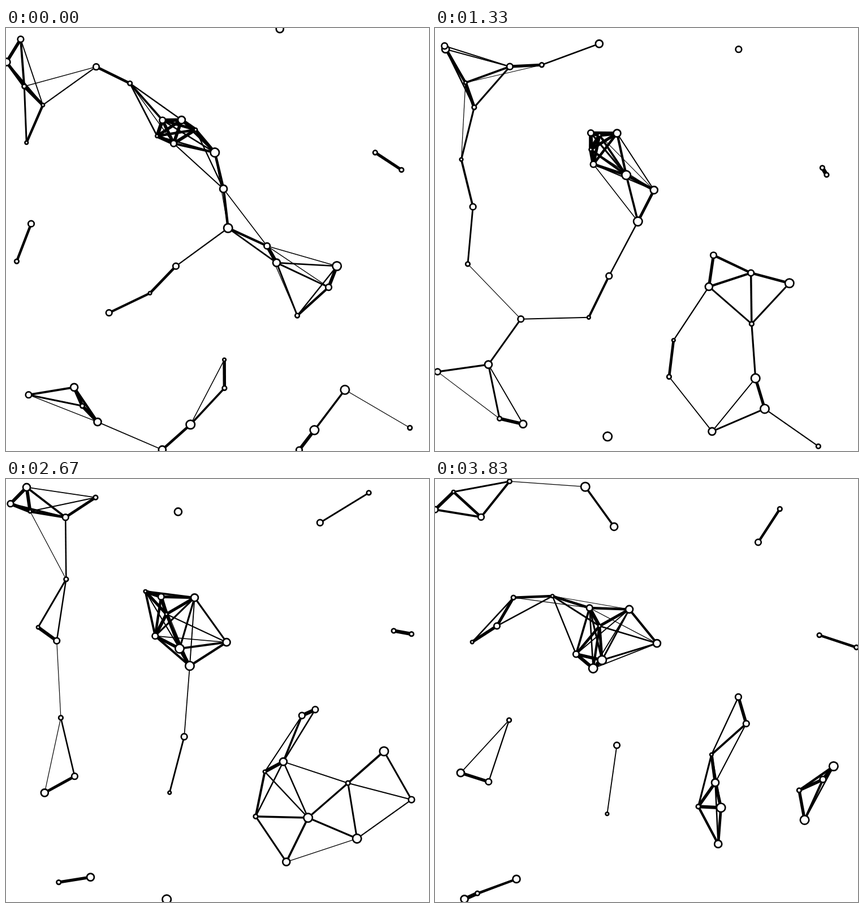
Recreate the animation shown at these times as an HTML page with a canvas. Size 748 by 748 pixels, loop 3.87 s.

```html
<!DOCTYPE html>
<html lang="en">
<head>
<meta charset="utf-8">
<title>Drifting network</title>
<style>
  html, body { margin: 0; height: 100%; overflow: hidden; background: #fff; }
  canvas { display: block; width: 100vw; height: 100vh; }
</style>
</head>
<body>
<canvas id="stage" width="748" height="748"></canvas>
<script>
const SIZE = 748, LOOP = 3870, FPS = 24, LAST_STEP = 92;
const REACH = 138.6;
const ctx = document.getElementById('stage').getContext('2d');
const dots = [];

// One maker per size: a dot passes (x, y) halfway through the loop, heading in degrees.
const [tiny, small, medium, large, huge] = [2.8, 3.8, 5.3, 6.5, 7.7].map(radius =>
  (x, y, heading) => dots.push({ radius, midX: x, midY: y, angle: heading * Math.PI / 180 }));

// Fastest first; the slow dots lie on top.
medium(737, 590, 229);
huge(599.5, 657, -45);
small(85.5, 156.5, 45);
huge(645, 464.5, 36);
huge(324.5, 277.5, 128);
tiny(437.5, 537, -44);
small(662, 6, 138);
large(83, 577.5, 237);
small(579.5, 529.5, 18);
tiny(279.5, 530.5, 68);
tiny(271.5, 193.5, 168);
small(175.5, 51, 227);
medium(545, 55, 65);
large(487, 476, 82);
small(699, 259, 40);
tiny(49, 79.5, 254);
medium(273, 257, 114);
small(75, 419.5, 7);
huge(552.5, 610.5, 212);
medium(77, 303, -53);
large(492.5, 697.5, -81);
huge(344, 337, 199);
medium(506, 409, 28);
small(426, 608, -36);
large(296.5, 41, 65);
medium(138.5, 519.5, 160);
tiny(51, 245.5, 71);
small(105, 700.5, 133);
huge(296, 731.5, 135);
large(26.5, 27.5, -52);
medium(553.5, 422, 245);
medium(120.5, 68, 181);
large(327, 196.5, 64);
tiny(279, 225.5, 71);
medium(275, 195.5, 93);
medium(311, 446, 67);
medium(13, 37, 127);
small(689.5, 263.5, 128);
large(153, 702, 149);
large(388.5, 287.5, 38);

// Distance covered in one loop, from the speed rank: steep for the slowest few, then gentle.
dots.forEach((dot, i) => {
  const rank = dots.length - 1 - i;
  dot.travel = Math.min(10 + 11 * rank, 58 + 2.5 * rank);
});

const wrap = v => (v % SIZE + SIZE) % SIZE;

// Steps run at 24 per second, with their times rounded to 10 ms.
const stepAt = ms => Math.min(LAST_STEP, Math.floor((Math.floor(ms / 10) * 10 + 4.9) * FPS / 1000));

function link(a, b) {
  const distance = Math.hypot(a.x - b.x, a.y - b.y);
  if (distance >= REACH) return;
  ctx.lineWidth = 8 - 0.05 * distance;
  ctx.beginPath();
  ctx.moveTo(a.x, a.y);
  ctx.lineTo(b.x, b.y);
  ctx.stroke();
}

function drawDot({ x, y, radius }) {
  ctx.beginPath();
  ctx.arc(x, y, radius, 0, 2 * Math.PI);
  ctx.fill();
  ctx.stroke();
}

function draw(ms) {
  const fromMiddle = stepAt(ms) / LAST_STEP - 0.5;
  for (const dot of dots) {
    dot.x = wrap(dot.midX + Math.cos(dot.angle) * dot.travel * fromMiddle);
    dot.y = wrap(dot.midY + Math.sin(dot.angle) * dot.travel * fromMiddle);
  }
  ctx.fillStyle = '#fff';
  ctx.strokeStyle = '#000';
  ctx.fillRect(0, 0, SIZE, SIZE);
  dots.forEach((a, i) => dots.slice(i + 1).forEach(b => link(a, b)));
  ctx.lineWidth = 2.7;
  dots.forEach(drawDot);
}

const start = performance.now();
function tick() {
  draw((performance.now() - start) % LOOP);
  requestAnimationFrame(tick);
}
tick();
</script>
</body>
</html>
```
